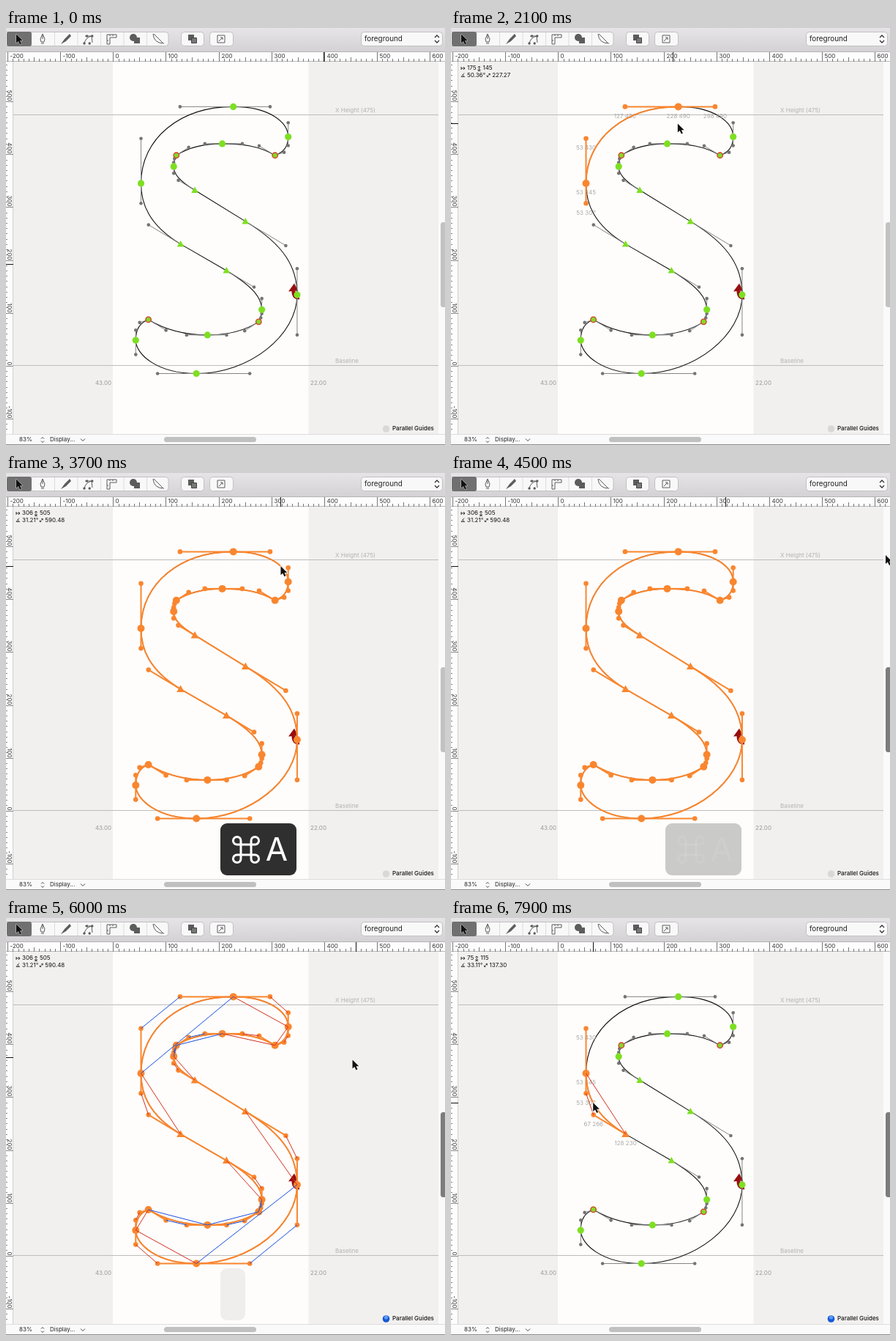
Recreate the animation shown at these times as an HTML page with a canvas. Size 600 px wide and 569 px high, loop 8000 ms.

```html
<!DOCTYPE html>
<html lang="en">
<head>
<meta charset="utf-8">
<title>Glyph editor</title>
<style>
  html, body { margin: 0; width: 100%; height: 100%; overflow: hidden; background: #f2f0ee; }
  canvas { display: block; width: 600px; height: 569px; }
</style>
</head>
<body>
<canvas id="stage"></canvas>
<script>
const LOOP = 8000, STEP = 100, W = 600, H = 569, TAU = Math.PI * 2;
const ORANGE = '#f9862f', GREEN = '#7ddf22', RED = '#d2301c', BLUE = '#1c4fdc';
const FONT = 'Inter, "Open Sans", sans-serif';
const canvas = document.getElementById('stage');
const scale = Math.max(1, window.devicePixelRatio || 1);
canvas.width = W * scale;
canvas.height = H * scale;
const g = canvas.getContext('2d');

const UNIT = 0.721;
const px = x => 146.3 + x * UNIT;
const py = y => 460.7 - y * UNIT;

// Tangent directions in and out of a node, and how far its handles reach
// towards the point where the two tangents of a segment meet.
const level = { in: [1, 0], out: [1, 0], pull: 0.62 };
const upright = { in: [0, 1], out: [0, 1], pull: 0.62 };
const stem = { in: [1, -0.6], out: [1, -0.6], pull: 0.78, straight: true };
const tip = { in: [1, 0.33], out: [1, -0.6], pull: 0.69, corner: true };
const hook = { in: [1, 0.65], out: [1, 1.8], pull: 0.69, corner: true };

const node = (x, y, kind, pulls) => ({ at: [x, y], kind, pulls });
const nodes = [
  node(228, 490, level, [0.67, 0.47]), node(332, 433, upright),
  node(307, 398, tip, [0.82, 0.6]), node(207, 420, level),
  node(120, 398, hook), node(115, 377, upright),
  node(155, 332, stem), node(251, 273, stem),
  node(349, 134, upright, [0.51, 0.53]), node(158, -15, level, [0.64, 0.43]),
  node(43, 48, upright), node(67, 87, tip),
  node(179, 58, level), node(276, 83, hook),
  node(282, 106, upright), node(215, 180, stem),
  node(128, 230, stem, [0.81, 0.54]), node(53, 345, upright, [0.586, 0.577])
];

function meet(p, u, q, v) {
  const k = ((q[0] - p[0]) * v[1] - (q[1] - p[1]) * v[0]) / (u[0] * v[1] - u[1] * v[0]);
  return [p[0] + u[0] * k, p[1] + u[1] * k];
}
const mix = (p, q, k) => p.map((v, i) => v + (q[i] - v) * k);

const segments = nodes.map((a, i) => {
  const to = (i + 1) % nodes.length, b = nodes[to];
  const seg = { from: i, to, ends: [a.at, b.at], arms: [] };
  if (a.kind.straight && b.kind.straight) return seg;
  const peak = meet(a.at, a.kind.out, b.at, b.kind.in);
  const pulls = a.pulls || [a.kind.pull, b.kind.pull];
  seg.arms = seg.ends.map((p, k) => mix(p, peak, pulls[k]));
  return seg;
});
const handles = segments.flatMap(s =>
  s.arms.map((at, k) => ({ at, owner: k ? s.to : s.from })));

function onCurve(index, u) {
  let pts = [segments[index].ends[0], ...segments[index].arms, segments[index].ends[1]];
  while (pts.length > 1) pts = pts.slice(1).map((p, i) => mix(pts[i], p, u));
  return [px(pts[0][0]), py(pts[0][1])];
}

// A stop on a segment is followed by a click that selects it.
const TOP_LEFT = 17, TOP_RIGHT = 0, LOW_LEFT = 16, CLICK_DELAY = 200;
const SELECT_ALL = 3600, GUIDES_ON = 5000, LEAVE = 4200, BACK = 5300;
const START = [px(400), 322.5], OUTSIDE = [594, 112];
const toSegment = (start, end, pick, u) => ({ start, end, pick, to: onCurve(pick, u) });
const moves = [
  { start: 500, end: 700, to: [440, 300] },
  toSegment(900, 1280, TOP_LEFT, 0.515),
  toSegment(1700, 2400, TOP_RIGHT, 0.63),
  { start: LEAVE, end: 4400, to: OUTSIDE },
  { start: BACK, end: 6000, to: [473.5, 193.5] },
  toSegment(6000, 6400, TOP_RIGHT, 0.63),
  toSegment(6600, 7000, TOP_LEFT, 0.515),
  toSegment(7200, 7500, LOW_LEFT, 0.52)
];

function cursorAt(t) {
  return moves.reduce((pos, m) =>
    mix(pos, m.to, Math.max(0, Math.min(1, (t - m.start) / (m.end - m.start)))), START);
}
function selectionAt(t) {
  const clicked = moves.filter(m => 'pick' in m && m.end + CLICK_DELAY <= t).pop();
  if (!clicked) return null;
  return t >= SELECT_ALL && clicked.end < SELECT_ALL ? 'all' : clicked.pick;
}

function line(x0, y0, x1, y1, color, width = 1) {
  g.strokeStyle = color;
  g.lineWidth = width;
  g.beginPath();
  g.moveTo(x0, y0);
  g.lineTo(x1, y1);
  g.stroke();
}
function unitLine(a, b, color, width) {
  line(px(a[0]), py(a[1]), px(b[0]), py(b[1]), color, width);
}
function dot(x, y, r, color) {
  g.fillStyle = color;
  g.beginPath();
  g.arc(x, y, r, 0, TAU);
  g.fill();
}
function box(x, y, w, h, r, fill, stroke) {
  g.beginPath();
  g.roundRect(x, y, w, h, r);
  g.fillStyle = fill;
  g.fill();
  if (stroke) { g.strokeStyle = stroke; g.lineWidth = 1; g.stroke(); }
}
function text(s, x, y, color = '#111', size = 8, align = 'left', weight = 400) {
  g.font = `${weight} ${size}px ${FONT}`;
  g.textAlign = align;
  g.textBaseline = 'middle';
  g.fillStyle = color;
  g.fillText(s, x, y);
}
function shape(d, x, y, fill, stroke, width = 1) {
  const p = new Path2D(d);
  g.save();
  g.translate(x, y);
  if (stroke) { g.strokeStyle = stroke; g.lineWidth = width; g.stroke(p); }
  if (fill) { g.fillStyle = fill; g.fill(p); }
  g.restore();
}
function rect(x, y, w, h, color) {
  g.fillStyle = color;
  g.fillRect(x, y, w, h);
}

const ARROW = 'M0 0V12L2.8 9.4L5 14L7 13L5 8.7H8.8Z';

function toolbar() {
  const shade = g.createLinearGradient(0, 0, 0, 33);
  shade.addColorStop(0, '#e6e4e6');
  shade.addColorStop(1, '#d3d1d3');
  rect(0, 0, W, 33, shade);
  line(0, 32.5, W, 32.5, '#b5b3b5');
  for (const [x, w] of [[-5, 227], [239.5, 31], [278.5, 32], [485.5, 111]])
    box(x, 5.5, w, 19, 4, '#f8f8f8', '#c2c0c2');
  box(1, 5, 34, 20, 3, '#717071');
  for (let x = 66.5; x < 200; x += 31.5) line(x, 6, x, 24, '#dcdcdc');
  const ink = '#5c5c5c';
  shape(ARROW, 14, 8.5, '#111', '#ddd');
  shape('M0 -7L3 0L2 4H-2L-3 0ZM0 -6V0M-2 6H2', 50, 15, null, ink);
  shape('M-7 7L-2 0L5 -7L7 -4L0 3Z', 82, 15, ink);
  shape('M-6 7Q-5 -2 4 -4M-5 -4L4 -4L5 5', 113, 15, null, ink);
  for (let i = 0; i < 4; i++) dot(107 + i * 3.6, i % 2 ? 11 : 21, 1.7, ink);
  shape('M-6 -6H7V-2H-2V7H-6ZM-2 -6V-4M2 -6V-4M-6 2H-4', 144, 15, null, ink);
  dot(174, 13, 5, ink);
  rect(175, 13, 8, 8, ink);
  shape('M-7 -7Q-6 6 8 6M-6 -7L6 5', 208, 15, null, ink);
  rect(249, 9, 8, 8, ink);
  box(253.5, 13.5, 7, 7, 0, '#777', '#444');
  shape('M-5 -5H5V5H-5ZM-3 3L2 -2M-1 -2H2V1', 294, 15, null, ink);
  text('foreground', 490, 15, '#222', 9.9);
  shape('M-3 -2L0 -5L3 -2M-3 2L0 5L3 2', 589, 15, null, '#333', 1.3);
}

// One ruler along the x axis of the current transform.
function ruler(length, size, toScreen, tick, mark) {
  g.beginPath();
  g.rect(0, 0, length, size);
  g.clip();
  for (let u = -200; u <= 620; u += 10) {
    const p = Math.round(toScreen(u)) + 0.5;
    tick(p, u);
  }
  line(mark, 0, mark, size, '#111');
}
function rulers([mx, my]) {
  rect(0, 33, W, 13, '#fdfdfd');
  rect(0, 46, 10, 508, '#fdfdfd');
  line(0, 45.5, W, 45.5, '#b8b8b8');
  line(9.5, 46, 9.5, 554, '#d0d0d0');
  g.save();
  g.translate(0, 33);
  ruler(W, 13, px, (p, u) => {
    line(p, u % 100 ? (u % 50 ? 9 : 7) : 0, p, 13, '#777');
    if (u % 100 === 0) text(u, p + 3, 6, '#333');
  }, mx);
  g.restore();
  g.save();
  g.translate(10, 46);
  g.rotate(Math.PI / 2);
  ruler(508, 10, u => py(u) - 46, (p, u) => {
    line(p, u % 100 ? 8 : 0, p, 10, '#888');
    if (u % 100 === 0) text(u, p - 1, 5.5, '#333', 8, 'right');
  }, my - 46);
  g.restore();
}

function backdrop(t) {
  rect(0, 0, W, H, '#f2f0ee');
  rect(146, 46, 267.5, 508, '#fefdfc');
  rect(591, 46, 9, 508, '#fafafa');
  line(10, 118.5, 591, 118.5, '#bebdbc');
  line(10, 460.5, 591, 460.5, '#bebdbc');
  text('X Height (475)', 450, 112.3, '#b3b2b1');
  text('Baseline', 450, 454.8, '#b3b2b1');
  text('43.00', 144, 484.5, '#999', 8, 'right');
  text('22.00', 416, 484.5, '#999');
  box(594, 265, 8, 116, 3.5, t >= 4400 ? '#7c7c7c' : '#c2c2c2');
  rect(0, 554, W, 15, '#fafafa');
  line(0, 554.5, W, 554.5, '#dcdcdc');
  line(0, 568.5, W, 568.5, '#8b8b8b');
  box(216, 558, 126, 7, 3.5, '#c0c0c0');
  text('83%', 18, 562, '#222');
  text('Display...', 60, 562, '#222');
  shape('M-2 -1.5L0 -3.5L2 -1.5M-2 1.5L0 3.5L2 1.5', 50, 562, null, '#444');
  shape('M-3 -1.5L0 1.5L3 -1.5', 105, 562, null, '#444');
  const on = t >= GUIDES_ON;
  dot(519.5, 547, 4.8, on ? '#1558d6' : '#d9d8d8');
  if (on) dot(519.5, 545, 2.6, '#5c9cf5');
  text('Parallel Guides', 528, 547, '#111', 8, 'left', 500);
}

function strokeCurve(list, color, width) {
  g.beginPath();
  for (const { ends: [a, b], arms } of list) {
    const [c, d] = arms.length ? arms : [a, b];
    g.moveTo(px(a[0]), py(a[1]));
    g.bezierCurveTo(px(c[0]), py(c[1]), px(d[0]), py(d[1]), px(b[0]), py(b[1]));
  }
  g.strokeStyle = color;
  g.lineWidth = width;
  g.stroke();
}

function drawNode({ at, kind }, on) {
  const x = px(at[0]), y = py(at[1]), color = on ? ORANGE : GREEN;
  if (kind.straight) {
    const r = on ? 5.4 : 4.8;
    shape(`M0 ${-r}L${r} ${r * 0.75}H${-r}Z`, x, y, color);
  } else if (kind.corner && !on) {
    dot(x, y, 4.4, '#d63a22');
    dot(x, y, 3.1, '#86d62c');
  } else dot(x, y, on ? 5 : 4.6, color);
}

function drawHandles(list, color, width, radius, dotColor) {
  for (const h of list) unitLine(nodes[h.owner].at, h.at, color, width);
  for (const h of list) dot(px(h.at[0]), py(h.at[1]), radius, dotColor);
}

function parallel(p, q) {
  const angle = ([a, b]) => Math.atan2(b[1] - a[1], b[0] - a[0]);
  return Math.abs(Math.sin(angle(p) - angle(q))) < 0.06;
}

function glyph(sel, guides) {
  const all = sel === 'all';
  const picked = segments.filter(s => all || s.from === sel);
  const isOn = i => picked.some(s => s.from === i || s.to === i);
  const onNodes = nodes.filter((n, i) => isOn(i));
  const onHandles = handles.filter(h => isOn(h.owner));

  shape('M-4 -2Q-4 7 4 7', 397, 361, null, '#970e0e', 5);
  shape('M0 0L-8 11L5 10Z', 394, 348.5, '#970e0e');
  strokeCurve(segments, '#111', 1.1);
  drawHandles(handles.filter(h => !isOn(h.owner)), '#858585', 1, 2.3, '#747474');
  nodes.forEach((n, i) => isOn(i) || drawNode(n, false));
  if (!picked.length) return;

  if (!all) for (const { at: [x, y] } of [...onNodes, ...onHandles])
    text(`${Math.round(x)} ${Math.round(y)}`, px(x), py(y) + 13, '#aaa9a8', 8, 'center');
  strokeCurve(picked, ORANGE, 2);
  drawHandles(onHandles, ORANGE, 2, 3.3, ORANGE);
  onNodes.forEach(n => drawNode(n, true));
  if (guides) for (const { ends, arms } of picked) {
    if (!arms.length) continue;
    const color = parallel(ends, arms) ? BLUE : RED;
    unitLine(...ends, color);
    unitLine(...arms, color);
  }
  measure(onNodes.map(n => n.at));
}

function measure(points) {
  const span = k => Math.max(...points.map(p => p[k])) - Math.min(...points.map(p => p[k]));
  const w = span(0), h = span(1);
  const angle = (Math.atan2(w, h) * 360 / TAU).toFixed(2) + '°';
  shape('M0 -2V2M0 0H5M3 -2L5 0L3 2', 14, 55, null, '#222', 0.9);
  text(w, 22, 55);
  const x = 24 + g.measureText(w).width;
  shape('M2 -3V2M0 -1L2 -3L4 -1M0 1L2 3L4 1M0 3.5H4', x, 55, null, '#222', 0.8);
  text(h, x + 7, 55);
  shape('M4 -3L0 2H5M2 -1Q4 0 3 2', 14, 64.5, null, '#222', 0.8);
  text(angle, 22, 64.5);
  const d = 24 + g.measureText(angle).width;
  shape('M0 2L4 -2M2 -2H4V0M0 0V2H2', d, 64.5, null, '#222', 0.8);
  text(Math.hypot(w, h).toFixed(2), d + 7, 64.5);
}

function commandSign(x, y) {
  g.strokeStyle = '#fff';
  g.lineWidth = 3;
  g.strokeRect(x - 7, y - 7, 14, 14);
  for (let i = 0; i < 4; i++) {
    g.save();
    g.translate(x, y);
    g.rotate(i * TAU / 4);
    g.stroke(new Path2D('M7 -7V-12A5.3 5.3 0 1 1 12 -7Z'));
    g.restore();
  }
}

function keyOverlay(age, width, showKeys) {
  if (age < 0) return;
  const alpha = Math.max(0, Math.min(1, (1040 - age) / 555));
  g.save();
  g.globalAlpha = alpha;
  box(293, 478, width, 71, 9, 'rgba(0,0,0,.81)');
  if (showKeys) {
    g.globalAlpha = alpha === 1 ? 1 : alpha * 0.35;
    commandSign(328, 514);
    text('A', 370, 515.5, '#fff', 44, 'center');
  }
  g.restore();
}

function draw(t) {
  g.setTransform(scale, 0, 0, scale, 0, 0);
  const cursor = cursorAt(t);
  // The ruler marks trail the cursor and stay put while it is outside.
  const markTime = t >= LEAVE && t <= BACK ? LEAVE : Math.max(0, t - 28);
  backdrop(t);
  glyph(selectionAt(t), t >= GUIDES_ON);
  toolbar();
  rulers(cursorAt(markTime).map(v => Math.floor(v) + 0.5));
  keyOverlay(t - SELECT_ALL, 104, true);
  keyOverlay(t - GUIDES_ON, 34, false);
  if (t >= 600) shape(ARROW, ...cursor, '#111', '#fff', 1.4);
}

const origin = performance.now();
function tick() {
  const t = (performance.now() - origin) % LOOP;
  draw(Math.floor(t / STEP) * STEP);
  requestAnimationFrame(tick);
}
tick();
</script>
</body>
</html>
```
